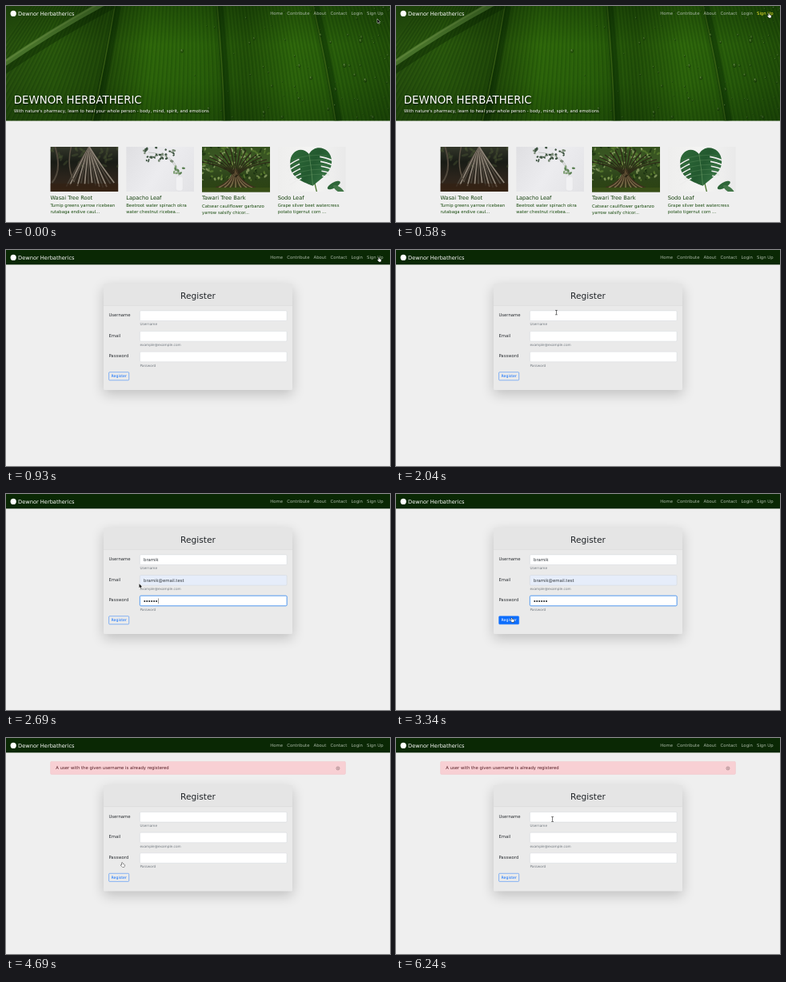
An HTML page with a canvas for the animation above (6.29 s loop, 480 px wide and 270 px high).

```html
<!DOCTYPE html>
<html lang="en">
<head>
<meta charset="utf-8">
<title>Herbal remedies</title>
<style>
html, body { margin: 0; width: 100%; height: 100%; overflow: hidden; background: #efefef; }
canvas { display: block; width: 480px; height: 270px; }
</style>
</head>
<body>
<canvas id="stage"></canvas>
<script>
const W = 480, H = 270, LOOP = 6290, REM = 16 / 3;
const BRAND = 'Dewnor Herbatherics', USER = 'bramik', MAIL = 'bramik@email.test';
const NAV = [['Home', 330.3], ['Contribute', 351.2], ['About', 384.5], ['Contact', 405.6], ['Login', 431.5], ['Sign Up', 451]];
const FIELDS = ['Username', 'Email', 'Password'];
const HINTS = ['Username', 'example@example.com', 'Password'];
// moments of the story, in ms
const OPEN_FORM = 930, LEAVE_LINK = 1480, FILL = 2390, HOVER_BUTTON = 3040, SUBMIT = 3690, REPLY = 3940, RETURN = 5840;
const FORM_TOP = 42.3, FORM_TOP_ALERT = 58.9;
const INPUT = { x: 167.4, dy: 33.6, w: 183.7, h: 12.6, pitch: 25.65 };
const BUTTON = { x: 128.6, dy: 110.4, w: 25.1, h: 10.1 };
const stage = document.getElementById('stage');
const dpr = window.devicePixelRatio || 1;
let ctx;

function prepare(canvas) {
  canvas.width = W * dpr;
  canvas.height = H * dpr;
  const c = canvas.getContext('2d');
  c.scale(dpr, dpr);
  return c;
}

const clamp = v => Math.max(0, Math.min(1, v));
const ramp = (t, from, span = 150) => clamp((t - from) / span);
const mix = (a, b, k) => a + (b - a) * k;
const linear = k => k;
const smooth = k => k * k * (3 - 2 * k);
const easeOut = k => 1 - (1 - k) ** 2;

function text(s, x, y, size, color, align = 'left') {
  ctx.font = `${size}px "DejaVu Sans", sans-serif`;
  ctx.textAlign = align;
  ctx.fillStyle = color;
  ctx.fillText(s, x, y);
}

function box(x, y, w, h, r, fill, stroke, line = 0.4) {
  ctx.beginPath();
  ctx.roundRect(x, y, w, h, r);
  if (fill) { ctx.fillStyle = fill; ctx.fill(); }
  if (stroke) { ctx.strokeStyle = stroke; ctx.lineWidth = line; ctx.stroke(); }
}

function rect(x, y, w, h, fill) {
  ctx.fillStyle = fill;
  ctx.fillRect(x, y, w, h);
}

function oval(x, y, rx, ry, angle, fill) {
  ctx.beginPath();
  ctx.ellipse(x, y, rx, ry, angle, 0, 7);
  ctx.fillStyle = fill;
  ctx.fill();
}

function curve(x0, y0, cx, cy, x1, y1, color, width) {
  ctx.beginPath();
  ctx.moveTo(x0, y0);
  ctx.quadraticCurveTo(cx, cy, x1, y1);
  ctx.strokeStyle = color;
  ctx.lineWidth = width;
  ctx.stroke();
}

function gradient(x0, y0, x1, y1, ...colors) {
  const g = ctx.createLinearGradient(x0, y0, x1, y1);
  colors.forEach((c, i) => g.addColorStop(i / (colors.length - 1), c));
  return g;
}

function random(seed) {
  return () => (seed = seed * 16807 % 2147483647) / 2147483647;
}

function clipped(x, y, w, h, draw) {
  ctx.save();
  ctx.beginPath();
  ctx.rect(x, y, w, h);
  ctx.clip();
  ctx.translate(x, y);
  draw();
  ctx.restore();
}

function leafPhoto() {
  const rnd = random(41);
  const ribs = [[30, -70], [136, 108], [264, 273], [384, 412], [510, 560]];
  rect(0, 0, W, 144, gradient(0, 0, W, 0, '#26500d', '#28570c', '#1f4708', '#2d660a', '#2a620a', '#214f08', '#2d660b', '#275c0a', '#204e08'));
  for (let p = 0; p < 4; p++) {
    const a = ribs[p], b = ribs[p + 1];
    for (let k = 0; k < 1; k += 0.035) {
      const x0 = mix(a[0], b[0], k), x1 = mix(a[1], b[1], k), mid = (x0 + x1) / 2 + 2;
      curve(x0, 0, mid, 70, x1, 144, 'rgba(105,150,42,.16)', 0.6);
      curve(x0 + 2, 0, mid + 2, 70, x1 + 2, 144, 'rgba(8,38,0,.15)', 1.6);
    }
  }
  for (const [x0, x1] of ribs.slice(1, 4)) {
    const mid = (x0 + x1) / 2 + 2;
    for (let w = 14; w > 2; w -= 3) curve(x0 + 3, 0, mid + 3, 70, x1 + 3, 144, 'rgba(7,35,0,.13)', w);
    curve(x0, 0, mid, 70, x1, 144, 'rgba(84,125,30,.5)', 1.5);
  }
  curve(-5, 81, 62, 35, 134, -3, 'rgba(8,36,2,.4)', 12);
  curve(-5, 74, 60, 29, 130, -8, '#47722a', 7);
  curve(-5, 72, 60, 27, 128, -9, 'rgba(120,155,75,.4)', 2);
  for (let i = 0; i < 100; i++) {
    const x = 215 + 265 * Math.sqrt(rnd()), y = rnd() * 142, r = 0.4 + rnd() * rnd() * 1.8;
    oval(x + 0.3, y + 0.5, r, r * 1.3, 0.2, 'rgba(8,38,2,.55)');
    oval(x, y, r * 0.75, r, 0.2, 'rgba(80,125,42,.55)');
    oval(x - r * 0.3, y - r * 0.4, r * 0.25, r * 0.3, 0, 'rgba(220,240,200,.6)');
  }
  rect(0, 0, W, 144, gradient(0, 0, 0, 144, 'rgba(0,20,0,.28)', 'rgba(0,20,0,0)', 'rgba(0,20,0,.05)', 'rgba(0,20,0,.25)'));
}

function rootsPhoto() {
  const rnd = random(9);
  rect(0, 0, 85, 57, gradient(0, 0, 0, 57, '#33372a', '#191c16', '#2b241c', '#392718'));
  for (let i = 0; i < 30; i++)
    oval(rnd() * 85, rnd() * 24, 2 + rnd() * 4, 1.5, rnd() * 3, 'rgba(82,94,56,.35)');
  for (let i = 0; i < 14; i++) {
    const top = 42 + i * 0.8, foot = 20 + i * 4.6;
    curve(top + 8 - i, -2, mix(top, foot, 0.3), 20, foot, 44 + rnd() * 7, i % 2 ? '#8f8578' : '#4b443a', 1.7);
  }
  curve(6, 0, 15, 30, 2, 45, '#51493d', 2);
  curve(26, 0, 20, 25, 30, 44, '#5f5547', 1.5);
  rect(0, 46, 85, 11, 'rgba(52,32,17,.55)');
}

function sprigPhoto() {
  const rnd = random(17);
  rect(0, 0, 85, 57, gradient(0, 0, 85, 57, '#dfdfe2', '#ececef', '#e2e2e5'));
  curve(66, 36, 58, 8, 28, 7, '#8a9484', 0.4);
  curve(66, 36, 64, 20, 53, 13, '#8a9484', 0.4);
  for (let i = 0; i < 32; i++) {
    const x = 23 + rnd() * 38, y = 1 + rnd() * 17;
    oval(x, y, 1.1 + rnd() * 1.5, 0.9 + rnd() * 0.7, rnd() * 3, i % 3 ? '#3d5340' : '#7d8d79');
  }
  for (let i = 0; i < 9; i++)
    oval(59 + rnd() * 13, 24 + rnd() * 12, 2.1, 1.3, rnd() * 3, i % 2 ? '#5b8053' : '#84a279');
  box(62, 37, 9, 18, 3, '#f1f1f3', '#dcdcdf');
}

function treePhoto() {
  const rnd = random(77);
  rect(0, 0, 85, 57, gradient(0, 0, 0, 57, '#36531f', '#3a5624', '#2d4419', '#2c4312'));
  for (let i = 0; i < 170; i++)
    oval(rnd() * 85, rnd() * 42, 0.8 + rnd() * 2.3, 0.7 + rnd(), rnd() * 3, ['#14290e', '#668a35', '#aabd7c'][i % 3] + '99');
  for (let i = 0; i < 15; i++) {
    const side = i - 7;
    curve(42, 38, 42 + side * 2, 22, 42 + side * 6.5, Math.abs(side) * 3 - 2, '#2d2716', 1.2);
    curve(42, 28, 42 + side, 45, 42 + side * 3.5, 51, i % 2 ? '#7a6848' : '#3c301d', 1.7);
  }
  rect(0, 51, 85, 6, 'rgba(60,82,24,.75)');
}

function monsteraPhoto() {
  rect(0, 0, 85, 57, gradient(0, 0, 85, 0, '#eeeeed', '#f4f4f3', '#e9e9e9'));
  curve(38, 14, 45, 40, 49, 58, '#4c742f', 1.3);
  ctx.save();
  ctx.translate(39, 9);
  ctx.rotate(-0.12);
  ctx.beginPath();
  ctx.moveTo(0, 0);
  ctx.bezierCurveTo(9, -13, 29, -5, 27, 13);
  ctx.bezierCurveTo(25, 27, 11, 32, 0, 40);
  ctx.bezierCurveTo(-14, 33, -27, 25, -25, 10);
  ctx.bezierCurveTo(-24, -7, -8, -12, 0, 0);
  ctx.fillStyle = gradient(-25, 0, 25, 35, '#2d6838', '#23592f', '#3a7847');
  ctx.fill();
  for (let i = 0; i < 5; i++) {
    for (const side of [-1, 1]) {
      const y = 5 + i * 6;
      curve(side * 13, y, side * 20, y + 2, side * 29, y + 7, '#eeeeed', 1.6);
      curve(0, y - 3, side * 12, y - 3, side * 22, y, 'rgba(130,173,120,.6)', 0.4);
    }
  }
  curve(0, 0, 1, 20, 0, 39, '#78a870', 0.5);
  ctx.restore();
  oval(70, 48, 9, 3.5, -0.5, '#2d6538');
  oval(76, 53, 8, 3, 0.6, '#437749');
}

const PRODUCTS = [
  [rootsPhoto, 'Wasai Tree Root', 'Turnip greens yarrow ricebean', 'rutabaga endive caul...'],
  [sprigPhoto, 'Lapacho Leaf', 'Beetroot water spinach okra', 'water chestnut ricebea...'],
  [treePhoto, 'Tawari Tree Bark', 'Catsear cauliflower garbanzo', 'yarrow salsify chicor...'],
  [monsteraPhoto, 'Sodo Leaf', 'Grape silver beet watercress', 'potato tigernut corn ...']
];

function homePage() {
  rect(0, 0, W, H, '#efefef');
  clipped(0, 0, W, 143.5, leafPhoto);
  ctx.shadowColor = 'rgba(0,0,0,.8)';
  ctx.shadowBlur = 2 * dpr;
  ctx.shadowOffsetX = ctx.shadowOffsetY = 0.7 * dpr;
  text('DEWNOR HERBATHERIC', 9.8, 121.8, 13.333, '#fff');
  text("With nature's pharmacy, learn to heal your whole person - body, mind, spirit, and emotions", 10, 133, REM, '#fff');
  ctx.shadowColor = 'transparent';
  PRODUCTS.forEach(([photo, name, ...lines], i) => {
    const x = 55.4 + i * 94.8, drop = i === 2 ? 0.5 : 0;
    clipped(x, 176, 85, 56 + drop, photo);
    text(name, x, 241.5 + drop, 6.667, '#123e0a');
    lines.forEach((line, n) => text(line, x, 251.4 + drop + n * 8, REM, '#174a0d'));
  });
}

const homeLayer = document.createElement('canvas');
ctx = prepare(homeLayer);
homePage();
ctx = prepare(stage);

function navbar(hover) {
  oval(9.2, 9.4, 3.6, 3.6, 0, '#fff');
  text(BRAND, 15, 11.7, 6.667, '#fff');
  for (const [label, x] of NAV) {
    const k = label === 'Sign Up' ? hover : 0;
    text(label, x, 11.2, REM, `rgb(${mix(170, 242, k)},${mix(184, 232, k)},${mix(166, 45, k)})`);
  }
}

function tick(x, y) {
  ctx.beginPath();
  ctx.moveTo(x - 2.3, y);
  ctx.lineTo(x - 0.7, y + 1.6);
  ctx.lineTo(x + 2.4, y - 1.6);
  ctx.strokeStyle = '#28a745';
  ctx.lineWidth = 1.1;
  ctx.stroke();
}

function input(row, y, s) {
  const { x, w, h } = INPUT, focus = s.focus[row], value = s.values[row];
  if (focus) box(x - 0.5, y - 0.5, w + 1, h + 1, 1.8, `rgba(13,110,253,${0.28 * focus})`);
  box(x, y, w, h, 1.3, row === 1 && value ? '#e6edfa' : '#fff', '#c9cfd5');
  if (focus) box(x, y, w, h, 1.3, null, `rgba(70,150,245,${focus})`, 0.8);
  if (s.valid) {
    box(x, y, w, h, 1.3, null, `rgba(70,180,100,${0.8 * s.valid})`, 0.4);
    ctx.globalAlpha = s.valid;
    if (row !== 1) tick(345, y + 6.2);
    ctx.globalAlpha = 1;
  }
  let end = 172;
  if (row === 2) {
    for (let i = 0; i < value; i++) oval(173.3 + i * 2.95, y + 6.8, 1.05, 1.05, 0, '#24292e');
    end += value * 2.95 + 0.5;
  } else {
    text(value, 172, y + 8.4, REM, '#30363b');
    end += ctx.measureText(value).width + 0.3;
  }
  if (s.caret === row) rect(end, y + 3.2, 0.45, 6.6, '#222');
}

function button(y, s) {
  const { x, w, h } = BUTTON, k = s.hover;
  if (s.pressed) box(x - 1.2, y - 1.2, w + 2.4, h + 2.4, 2, `rgba(13,110,253,${0.4 * s.pressed})`);
  box(x, y, w, h, 1, `rgba(13,110,253,${k})`, '#0d6efd', 0.45);
  text('Register', x + w / 2, y + 6.7, 4.667, `rgb(${mix(13, 255, k)},${mix(110, 255, k)},${mix(253, 255, k)})`, 'center');
}

function alertBar() {
  box(55.6, 29.4, 368.8, 16, 1.3, '#f8d0d4', '#f1bcc2');
  text('A user with the given username is already registered', 62.3, 39.3, REM, '#551b23');
  ctx.beginPath();
  ctx.arc(414.9, 37.9, 2, 0, 7);
  ctx.moveTo(414.2, 37.2); ctx.lineTo(415.6, 38.6);
  ctx.moveTo(415.6, 37.2); ctx.lineTo(414.2, 38.6);
  ctx.strokeStyle = '#75575b';
  ctx.lineWidth = 0.5;
  ctx.stroke();
}

function registerPage(s) {
  rect(0, 0, W, H, '#efefef');
  rect(0, 0, W, 18.3, '#0a2804');
  navbar(s.link);
  if (s.alert) alertBar();
  const top = s.alert ? FORM_TOP_ALERT : FORM_TOP;
  ctx.shadowColor = 'rgba(0,0,0,.2)';
  ctx.shadowBlur = 16 * dpr;
  ctx.shadowOffsetX = 0;
  ctx.shadowOffsetY = 5.3 * dpr;
  box(122, top, 236, 132.6, 1.3, '#eaeaea');
  ctx.shadowColor = 'transparent';
  box(122, top, 236, 27, [1.3, 1.3, 0, 0], '#e5e5e5');
  rect(122, top + 26.8, 236, 0.4, '#cfcfcf');
  text('Register', 240, top + 18.5, 10.667, '#212529', 'center');
  FIELDS.forEach((label, i) => {
    const y = top + INPUT.dy + i * INPUT.pitch;
    text(label, 128.4, y + 7.2, REM, '#2a2e32');
    input(i, y, s);
    text(HINTS[i], INPUT.x, y + 18.5, 4.267, '#737a80');
  });
  button(top + BUTTON.dy, s);
}

function shape(points, fill, stroke) {
  ctx.beginPath();
  points.forEach(([x, y]) => ctx.lineTo(x, y));
  ctx.closePath();
  ctx.lineJoin = 'round';
  ctx.lineWidth = 0.8;
  ctx.strokeStyle = stroke;
  ctx.stroke();
  ctx.fillStyle = fill;
  ctx.fill();
}

const CURSORS = {
  arrow() {
    shape([[0, 0], [0, 5], [1.2, 4], [2, 5.8], [2.8, 5.4], [2, 3.7], [3.5, 3.6]], '#111', '#fff');
  },
  hand() {
    shape([[0, 0], [0.7, 0.2], [0.8, 2], [2.9, 2.5], [3.3, 3.2], [2.7, 5.6], [0.5, 5.6], [-1.6, 3.3], [-1, 2.8], [-0.1, 3.4], [-0.3, 0.3]], '#fff', '#111');
  },
  beam() {
    rect(-0.3, -2.6, 0.6, 5.2, '#222');
    rect(-1.4, -3.1, 2.8, 0.6, '#222');
    rect(-1.4, 2.5, 2.8, 0.6, '#222');
  }
};

// legs of the pointer's path: start, end, destination, easing
const START = [464.2, 16.2];
const LEGS = [
  [30, 480, [465.8, 9.2], smooth],
  [LEAVE_LINK, 2090, [193, 80], smooth],
  [2090, 2240, [193, 83], easeOut],
  [FILL, 2690, [166.5, 112.3], smooth],
  [2690, 2990, [143.9, 153.8], easeOut],
  [2990, 3640, [145, 155.6], linear],
  [RETURN, 6240, [195.6, 101.5], smooth]
];

function pointerAt(t) {
  let [x, y] = START;
  for (const [from, to, [toX, toY], ease] of LEGS) {
    const k = ease(ramp(t, from, to - from));
    x = mix(x, toX, k);
    y = mix(y, toY, k);
  }
  return [x, y];
}

// the cursor's look depends on what lies below it; it only updates while moving
function cursorKind(t, x, y) {
  if (y < 14) return 'hand';
  if (t < OPEN_FORM) return 'arrow';
  const dy = y - (t > RETURN ? FORM_TOP_ALERT : FORM_TOP);
  const inside = (box, v) => x > box.x && x < box.x + box.w && v > 0 && v < box.h;
  if (inside(BUTTON, dy - BUTTON.dy)) return 'hand';
  const row = Math.floor((dy - INPUT.dy) / INPUT.pitch);
  return row >= 0 && row < 3 && inside(INPUT, dy - INPUT.dy - row * INPUT.pitch) ? 'beam' : 'arrow';
}

function pointer(t) {
  const [x, y] = pointerAt(t);
  ctx.save();
  ctx.translate(x, y);
  CURSORS[cursorKind(t, x, y)]();
  ctx.restore();
}

function formState(t) {
  const link = t < LEAVE_LINK ? ramp(t, OPEN_FORM) : 1 - ramp(t, LEAVE_LINK + 50);
  if (t >= REPLY) return { link, alert: true, values: ['', '', 0], focus: [0, 0, 0], caret: -1, valid: 0, hover: 0, pressed: 0 };
  const toPassword = FILL + 150;
  const caretOn = t < HOVER_BUTTON || t >= HOVER_BUTTON + 500;
  return {
    link,
    alert: false,
    values: [
      USER.slice(0, Math.floor(6 * ramp(t, FILL, 100))),
      t >= FILL + 100 ? MAIL : '',
      Math.floor(6 * ramp(t, toPassword, 100))
    ],
    focus: [
      ramp(t, FILL, 50) - ramp(t, toPassword, 100), 0,
      ramp(t, toPassword) - ramp(t, SUBMIT)
    ],
    caret: t < FILL || t >= SUBMIT ? -1 : t < toPassword ? 0 : caretOn ? 2 : -1,
    valid: ramp(t, SUBMIT),
    hover: ramp(t, HOVER_BUTTON),
    pressed: ramp(t, SUBMIT)
  };
}

function frame(now) {
  const time = now % LOOP;
  const base = time < 2090 ? 30 : 40;
  const t = base + Math.floor((time - base) / 50) * 50;
  if (t < OPEN_FORM) {
    ctx.drawImage(homeLayer, 0, 0, W, H);
    navbar(ramp(t, 230));
  } else {
    registerPage(formState(t));
  }
  pointer(t);
  requestAnimationFrame(frame);
}
requestAnimationFrame(frame);
</script>
</body>
</html>
```
